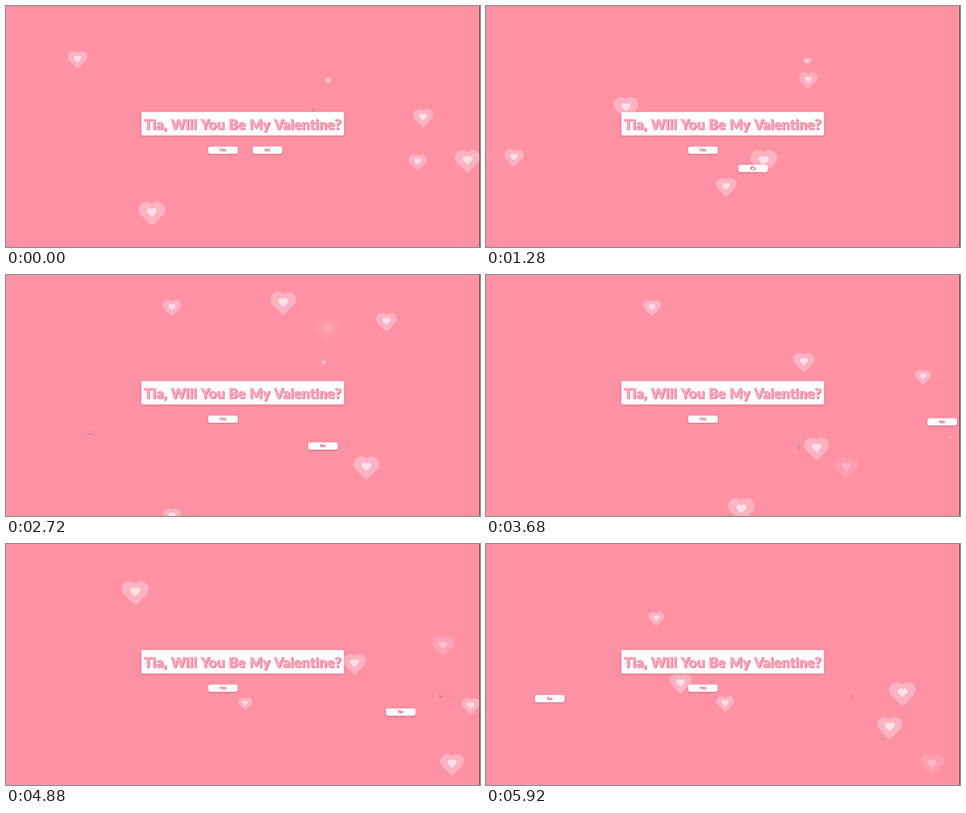
An HTML page with a canvas that plays this animation: 970 px wide and 494 px high, repeating every 6000 ms.

```html
<!DOCTYPE html>
<html lang="en">
<head>
<meta charset="utf-8">
<title>Valentine</title>
<style>
  html, body { margin: 0; width: 100%; height: 100%; overflow: hidden; background: #ff91a4; }
  canvas { display: block; }
</style>
</head>
<body>
<canvas id="stage" width="970" height="494"></canvas>
<script>
const ctx = document.getElementById('stage').getContext('2d');
const LOOP = 6000, STEP = 80;

// One heart is born every SPAWN ms; it swells, shrinks, then swells again while fading
const SPAWN = 250, FIRST = -1360;
const PEAK = 700, DIP = 1320, LIFE = 1680;

// Where the hearts appear, in order of birth
const spots = [
  [842, 321], [853, 230], [944, 319], [298, 426], [146, 111], [659, 153],
  [57, 312], [286, 210], [568, 320], [491, 372], [657, 114], [339, 495],
  [778, 97], [567, 59], [737, 396], [339, 68], [650, 180], [522, 482],
  [676, 357], [894, 210], [951, 333], [713, 247], [264, 101], [912, 453],
  [489, 328], [398, 287], [852, 308], [826, 378], [348, 154], [92, 294]
];

// The pointer chases the No button, which hops away during each leg
const HOP = .6;
const chase = [
  { t: 0, pointer: [628, 209], no: [535, 295.5] },
  { t: 1280, pointer: [545, 329], no: [546.5, 333] },
  { t: 2080, pointer: [188, 329], no: [116.5, 307] },
  { t: 2720, pointer: [171, 320], no: [648.5, 350.5] },
  { t: 3680, pointer: [638, 349], no: [933.5, 301] },
  { t: 4880, pointer: [887, 307], no: [808, 344.5] },
  { t: 5920, pointer: [747, 310], no: [130.5, 317] }
];

const mix = (a, b, p) => a + (b - a) * p;
const smooth = p => p * p * (3 - 2 * p);

function heartWidth(age) {
  if (age < PEAK) return 55 * Math.sin(Math.PI / 2 * age / PEAK);
  if (age < DIP) return mix(55, 36, smooth((age - PEAK) / (DIP - PEAK)));
  return mix(36, 56, smooth((age - DIP) / (LIFE - DIP)));
}

function heartShape(x, y, w, color) {
  const side = w * .588, c = side * .3536;
  const cy = y + side * .076;
  ctx.beginPath();
  ctx.arc(x - c, cy - c, side / 2, Math.PI * .75, Math.PI * 1.75);
  ctx.arc(x + c, cy - c, side / 2, Math.PI * 1.25, Math.PI * 2.25);
  ctx.arcTo(x, cy + 2 * c, x - 2 * c, cy, w * .06);
  ctx.closePath();
  ctx.fillStyle = color;
  ctx.fill();
}

function drawHeart([x, y], age) {
  if (age <= 0 || age >= LIFE) return;
  const w = heartWidth(age);
  ctx.globalAlpha = age < DIP ? 1 : 1 - smooth((age - DIP) / (LIFE - DIP));
  heartShape(x + .5, y, w, '#ffb2c0');
  heartShape(x + .5, y - w * .05, w * .38, '#ffe0e7');
  ctx.globalAlpha = 1;
}

function panel(x, y, w, h, r, shadow, blur, drop) {
  ctx.save();
  ctx.shadowColor = shadow;
  ctx.shadowBlur = blur;
  ctx.shadowOffsetY = drop;
  ctx.fillStyle = '#fff';
  ctx.beginPath();
  ctx.roundRect(x, y, w, h, r);
  ctx.fill();
  ctx.restore();
}

function drawTitle() {
  panel(277, 217, 415, 48.5, 3, 'rgba(130,40,65,.4)', 4, 1);
  ctx.strokeStyle = '#ffe9e6';
  ctx.lineWidth = 1.5;
  ctx.strokeRect(278, 218, 413, 46.5);

  const text = 'Tia, Will You Be My Valentine?';
  ctx.font = 'bold 28.5px Lato, sans-serif';
  ctx.letterSpacing = '0.6px';
  ctx.textAlign = 'center';
  ctx.lineJoin = 'round';
  ctx.lineWidth = 1.2;
  for (const [shift, color] of [[1.3, '#e0607f'], [0, '#ffa6ba']]) {
    ctx.fillStyle = ctx.strokeStyle = color;
    ctx.fillText(text, 484 + shift, 253 + shift);
    ctx.strokeText(text, 484 + shift, 253 + shift);
  }
  ctx.letterSpacing = '0px';
}

function drawButton(label, [x, y]) {
  panel(x - 30.25, y - 7.5, 60.5, 15, 4.5, 'rgba(120,30,60,.45)', 3, 1);
  ctx.font = 'bold 8.3px "Liberation Sans", Arial, sans-serif';
  ctx.textAlign = 'center';
  ctx.fillStyle = '#d6356c';
  ctx.fillText(label, x, y + 2.8);
}

function outline(path, x, y) {
  ctx.save();
  ctx.translate(x, y);
  ctx.lineJoin = 'round';
  ctx.lineWidth = .8;
  ctx.strokeStyle = '#7a5560';
  ctx.fillStyle = '#fff';
  ctx.fill(path);
  ctx.stroke(path);
  ctx.restore();
}

const arrow = new Path2D('M0 0V6L1.4 4.8 2.3 6.8 3.2 6.4 2.4 4.4 4.1 4.2Z');
const hand = new Path2D('M-1-1H.4L.6 2 5 3 5.6 4.2 4.8 7.5H.8L-2.6 4-1.8 3.4-.8 4Z');

function drawChase(t) {
  const i = chase.findLastIndex(leg => leg.t <= t);
  const from = chase[i], to = chase[i + 1] || from;
  const p = to === from ? 0 : (t - from.t) / (to.t - from.t);
  const no = p < HOP ? from.no : to.no;
  const [x, y] = from.pointer.map((v, n) => mix(v, to.pointer[n], p));
  drawButton('No', no);
  const over = Math.abs(x - no[0]) < 30 && Math.abs(y - no[1]) < 8;
  outline(over ? hand : arrow, x, y);
}

function draw(t) {
  ctx.fillStyle = '#ff91a4';
  ctx.fillRect(0, 0, 970, 494);
  spots.forEach((spot, i) => drawHeart(spot, t - FIRST - i * SPAWN));
  drawTitle();
  drawButton('Yes', [444, 295.5]);
  drawChase(t);
  ctx.fillStyle = '#120a0c';
  ctx.fillRect(969, 0, 1, 494);
}

const start = performance.now();
function tick() {
  const t = Math.floor((performance.now() - start) % LOOP / STEP) * STEP;
  draw(t < 2 * STEP ? 0 : t);
  requestAnimationFrame(tick);
}
tick();
</script>
</body>
</html>
```
